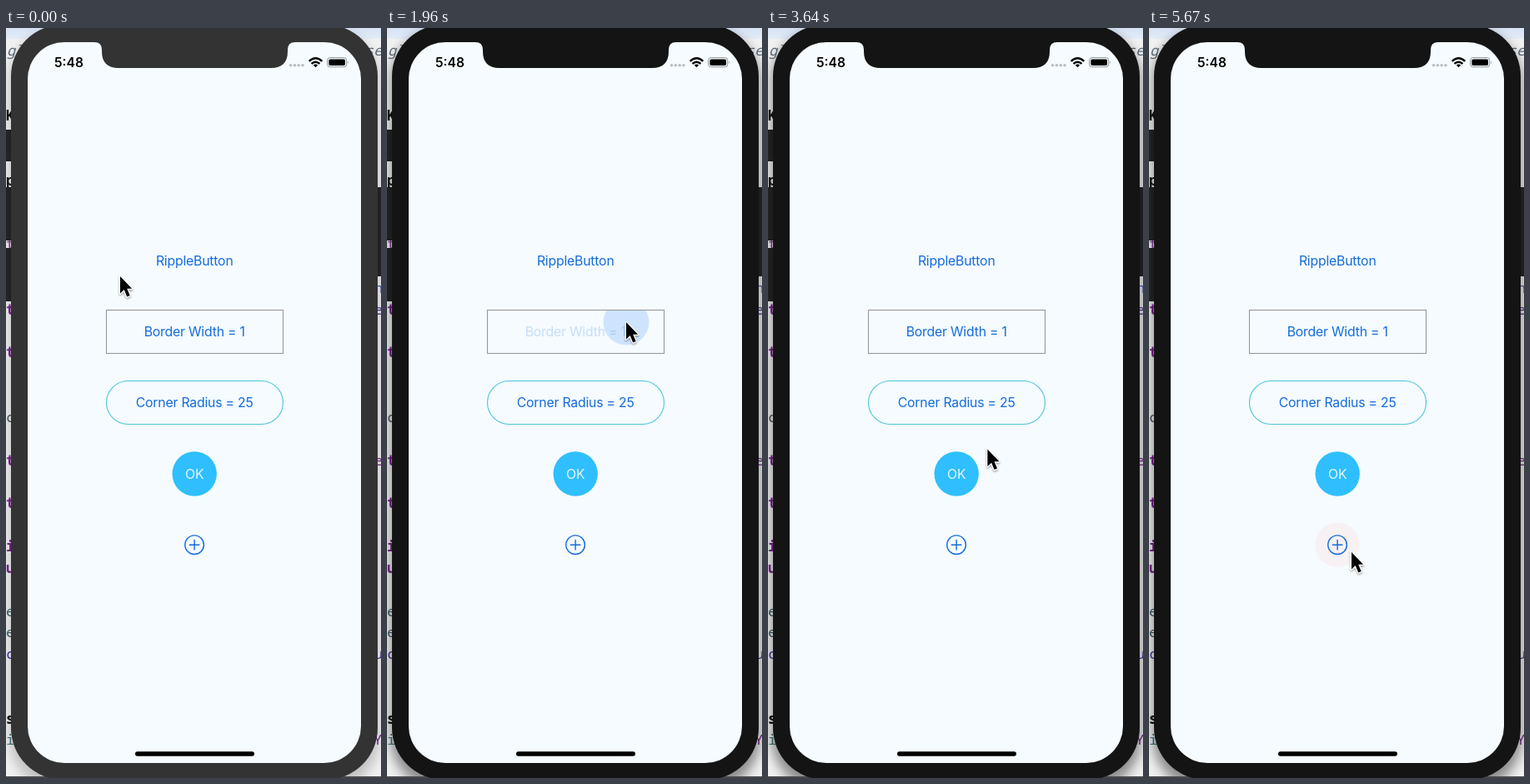
An HTML page for the animation above (5740 ms loop, 450 by 900 pixels).

```html
<!DOCTYPE html>
<html lang="en">
<head>
<meta charset="utf-8">
<title>Ripple buttons</title>
<style>
  html, body { margin: 0; width: 100%; height: 100%; overflow: hidden; background: #ececee; }
  svg { position: absolute; left: 0; top: 0; display: block; }
  text { font-family: Inter, "Open Sans", sans-serif; }
  .code text { font: 17px "Noto Sans Mono", "DejaVu Sans Mono", monospace; }
  .label { font-size: 15.8px; letter-spacing: -.2px; text-anchor: middle; }
  .blue { fill: #146bdc; }
</style>
</head>
<body>
<svg width="450" height="900" viewBox="0 0 450 900">
  <defs>
    <filter id="soft" x="-20%" y="-20%" width="140%" height="140%"><feGaussianBlur stdDeviation="7"/></filter>
    <filter id="drop" x="-50%" y="-50%" width="200%" height="200%">
      <feDropShadow dx="0" dy="1.5" stdDeviation="1.2" flood-opacity=".4"/>
    </filter>
    <linearGradient id="bar" x2="0" y2="1">
      <stop stop-color="#d5e3f5"/><stop offset="1" stop-color="#e3ecf8"/>
    </linearGradient>
  </defs>

  <rect width="450" height="900" fill="#f1f1f2"/>
  <rect width="450" height="13" fill="url(#bar)"/>
  <g class="code" id="code"></g>
  <g fill="#262628">
    <rect x="-4" y="122" width="14" height="38" rx="3"/>
    <rect x="-4" y="191" width="14" height="64" rx="3"/>
    <rect x="-4" y="264" width="14" height="64" rx="3"/>
    <rect x="440" y="191" width="14" height="107" rx="3"/>
  </g>
  <rect id="shade" x="4" y="2" width="444" height="912" rx="62" filter="url(#soft)"/>
  <rect y="898" width="450" height="2" fill="#4a4a4c"/>

  <g id="bezel">
    <rect x="6" y="-4" width="440" height="906" rx="62"/>
    <rect x="26" y="17" width="400" height="865" rx="44" fill="#f5fbff"/>
    <path d="M106 16V17Q115 17 115 26V28Q115 48 135 48H318Q338 48 338 28V26Q338 17 347 17V16Z"/>
  </g>

  <text x="58" y="47" font-size="15.6" font-weight="600">5:48</text>
  <g fill="#b9bdc1">
    <circle cx="341.6" cy="44.8" r="1.8"/><circle cx="346.4" cy="44.8" r="1.8"/>
    <circle cx="351.2" cy="44.8" r="1.8"/><circle cx="356" cy="44.8" r="1.8"/>
  </g>
  <g fill="none" stroke="#000" stroke-width="2.4">
    <path d="M363.7 39.9Q371.5 32.7 379.3 39.9M366.5 42.9Q371.5 38.4 376.5 42.9"/>
    <path d="M368.8 44.4Q371.5 42.4 374.2 44.4L371.5 47.2Z" fill="#000" stroke="none"/>
  </g>
  <rect x="385.7" y="35.7" width="23" height="11" rx="3" fill="none" stroke="#8d9093"/>
  <rect x="387.4" y="37.4" width="19.6" height="7.6" rx="1.7"/>
  <path d="M410 39.3Q411.6 41.2 410 43.2Z" fill="#8d9093"/>
  <rect x="155" y="868.3" width="143" height="5.4" rx="2.7"/>

  <g id="buttons"></g>

  <g id="cursor" filter="url(#drop)">
    <path d="M0 0V20.4L4.7 16.1L8.2 24.4L11.7 22.9L8.2 14.8H14.2Z"
      stroke="#fff" stroke-width="2.4" stroke-linejoin="round" paint-order="stroke"/>
  </g>
</svg>

<script>
const LOOP = 5740, STEP = 70;
const GROW = 280, FADE = 430, RECOVER = 280;
const $ = id => document.getElementById(id);
const clamp = v => Math.min(1, Math.max(0, v));

function add(parent, tag, attrs, text) {
  const el = document.createElementNS('http://www.w3.org/2000/svg', tag);
  for (const k in attrs) el.setAttribute(k, attrs[k]);
  if (text) el.textContent = text;
  parent.append(el);
  return el;
}

// Edges of the editor behind the window: x, baseline, text, colour, weight
const code = $('code');
[
  [0, 111, 'K', '#111', 700], [0, 189, 'p', '#111', 700],
  [0, 265, 't', '#8a3a98'], [0, 344, 't', '#7c2190', 600],
  [0, 395, 't', '#7c2190', 600], [0, 473, 'c', '#49545c'],
  [0, 525, 't', '#7c2190', 600], [0, 576, 't', '#7c2190', 600],
  [0, 628, 'i', '#7c2190', 700], [0, 654, 'u', '#7c2190', 700],
  [0, 706, 'e', '#3c5c68'], [0, 731, 'e', '#3c5c68'],
  [0, 757, 'c', '#4a2f9c'], [0, 835, 's', '#111', 700],
  [0, 860, 'i', '#3f7a80'], [442, 318, 'n', '#3d4db8'],
  [442, 344, 'e', '#4a2f9c'], [442, 525, 'e', '#7c2190'],
  [442, 757, 'u', '#4a2f9c'], [441, 860, 'Y', '#7c2190']
].forEach(([x, y, s, fill, weight = 400]) =>
  add(code, 'text', { x, y, fill, style: `font-weight:${weight}` }, s));
for (const [x, s] of [[1, 'gl'], [431, 'se']])
  add(code, 'text', { x, y: 33, fill: '#5d6c79', style: 'font-style:italic' }, s);

const BLUE = 'rgb(206,228,254)', PINK = 'rgb(255,196,190)';
const wide = { x: 120, w: 213 }, round = { x: 199.5, w: 53.4, r: 26.7 };
const buttons = [
  { ...wide, y: 252.6, text: 'RippleButton', wave: BLUE, at: [268, 281], down: 800, up: 1120 },
  { ...wide, y: 338, text: 'Border Width = 1', line: '#96989c', wave: BLUE, at: [287, 353], down: 1925, up: 2090 },
  { ...wide, y: 423, r: 26.5, text: 'Corner Radius = 25', line: '#4bc5dc', wave: PINK, at: [304, 445], down: 2800, up: 3115 },
  { ...round, y: 508.3, text: 'OK', fill: '#2fbffe', ink: '#e6f6ff', low: .1, wave: 'rgb(66,166,215)', at: [243, 536], down: 3900, up: 4200 },
  { ...round, y: 593.4, wave: PINK, at: [243, 629], down: 5000, up: 5320 }
];

buttons.forEach((b, i) => {
  const g = add($('buttons'), 'g', {});
  const { x, y, w, r = 0 } = b, h = r === 26.7 ? w : 53;
  const box = { x, y, width: w, height: h, rx: r };
  add(add(g, 'clipPath', { id: 'clip' + i }), 'rect', box);
  if (b.fill) add(g, 'rect', { ...box, fill: b.fill });
  b.ripple = add(add(g, 'g', { 'clip-path': `url(#clip${i})` }), 'circle',
    { cx: b.at[0], cy: b.at[1], fill: b.wave });
  if (b.line) add(g, 'rect', { x: x + .5, y: y + .5, width: w - 1, height: h - 1, rx: Math.max(0, r - .5), fill: 'none', stroke: b.line, 'stroke-width': 1.1 });
  if (b.text) {
    b.face = add(g, 'text', { x: 226.2, y: y + 32.4, class: 'label blue' }, b.text);
    if (b.ink) b.face.style.fill = b.ink;
  } else {
    b.face = add(g, 'path', {
      d: 'M214.8 620.2a11.3 11.3 0 1 0 22.6 0a11.3 11.3 0 1 0 -22.6 0M219.8 620.2h12.6M226.1 613.9v12.6',
      fill: 'none', stroke: '#146bdc', 'stroke-width': 1.4
    });
  }
  b.reach = Math.hypot(w, h);
});

// Pointer stops: arrive, leave, x, y
const stops = [
  [0, 70, 137, 298], [740, 1250, 268, 281], [1750, 2250, 287, 353],
  [2730, 3340, 304, 445], [3830, 4450, 243, 536], [4900, LOOP, 243, 629]
];

function pointer(t) {
  let i = stops.length - 1;
  while (i && t < stops[i][0]) i--;
  const [, leave, x, y] = stops[i], next = stops[i + 1];
  if (!next || t <= leave) return [x, y];
  const k = clamp((t - leave) / (next[0] - leave)), e = k * k * (3 - 2 * k);
  return [x + (next[2] - x) * e, y + (next[3] - y) * e];
}

function draw(t) {
  const active = t >= buttons[0].down;
  $('bezel').setAttribute('fill', active ? '#141414' : '#333');
  $('shade').setAttribute('opacity', active ? .42 : .2);
  $('cursor').setAttribute('transform', `translate(${pointer(t)})`);
  for (const b of buttons) {
    const grow = clamp((t - b.down) / GROW), low = b.low || .2;
    const fade = 1 - clamp((t - b.up) / FADE);
    const back = clamp((t - b.up) / RECOVER);
    b.ripple.setAttribute('r', b.reach * grow);
    b.ripple.setAttribute('opacity', fade);
    b.face.setAttribute('opacity', t < b.down ? 1 : low + (1 - low) * back);
  }
}

const start = performance.now();
function tick() {
  const t = (performance.now() - start) % LOOP;
  draw(Math.floor(t / STEP) * STEP);
  requestAnimationFrame(tick);
}
tick();
</script>
</body>
</html>
```
